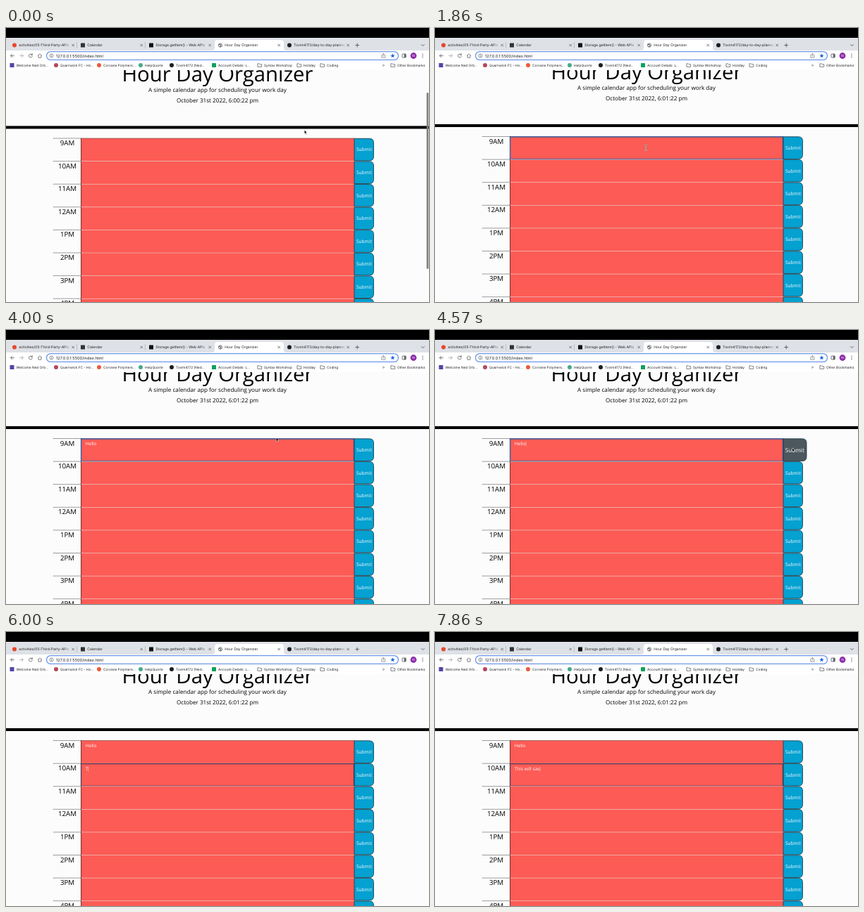
An HTML page that plays this animation: 600 px wide and 390 px high, repeating every 8000 ms.

```html
<!DOCTYPE html>
<html lang="en">
<head>
<meta charset="utf-8">
<title>Hour Day Organizer</title>
<style>
  html, body { margin: 0; width: 100%; height: 100%; overflow: hidden; background: #fcfcfc; }
  svg { display: block; text-rendering: geometricPrecision; }
  text { white-space: pre; }
  #page { font-family: "Open Sans", "Noto Sans", sans-serif; }
  #browser { font-family: Inter, Roboto, sans-serif; }
</style>
</head>
<body>
<svg width="600" height="390" viewBox="0 0 600 390">
  <defs>
    <linearGradient id="fade">
      <stop offset="0" stop-color="#dee1e6" stop-opacity="0"/>
      <stop offset="1" stop-color="#dee1e6"/>
    </linearGradient>
  </defs>
  <g id="page"></g>
  <g id="browser"></g>
  <g id="pointer"></g>
</svg>
<script>
const $ = id => document.getElementById(id);
const rect = (x, y, w, h, fill, more = '') =>
  `<rect x="${x}" y="${y}" width="${w}" height="${h}" fill="${fill}" ${more}/>`;
const circle = (x, y, r, fill, more = '') => `<circle cx="${x}" cy="${y}" r="${r}" fill="${fill}" ${more}/>`;
const path = (d, color, width = 0.8) =>
  `<path d="${d}" fill="none" stroke="${color}" stroke-width="${width}" stroke-linecap="round" stroke-linejoin="round"/>`;
const text = (x, y, size, str, fill = '#111', more = '') =>
  `<text x="${x}" y="${y}" font-size="${size}" fill="${fill}" ${more}>${str}</text>`;
const centred = (x, y, size, str, fill) => text(x, y, size, str, fill, 'text-anchor="middle"');
const icon = (x, y, color, round) => round ? circle(x, y, 3, color) : rect(x - 3, y - 3, 6, 6, color, 'rx="0.6"');

// ---- Browser frame ----
const GREY = '#5f6368';
const tabs = [
  [12, 'activities/05-Third-Party-APIs', '#e8472b', 1],
  [109, 'Calendar', '#333', 0],
  [206, 'Storage.getItem() - Web APIs', '#111', 0],
  [304, 'Hour Day Organizer', '', 0],
  [402, 'Tovim4172/day-to-day-planner', '#1b1f23', 1]
];
const bookmarks = [
  [8.5, 'Welcome Ned Orb...', '#5046a8', 0],
  [71, 'Quarnwick FC - Ho...', '#b5485a', 1],
  [132, 'Corvane Polymers...', '#ee5a3a', 1],
  [191, 'HelpQuorle', '#49a88a', 1],
  [235, 'Tovim4172 (Ned...', '#1b1f23', 1],
  [295, 'Account Details: L...', '#12a05c', 0],
  [360, 'Syntax Workshop'],
  [416, 'Holiday'],
  [449, 'Coding'],
  [549, 'Other Bookmarks']
];
const folder = (x, y) => path(`M${x - 2.7} ${y - 2.2}h2l.8 .9h2.6v3.6h-5.4z`, GREY);

function drawTab([x, title, color, round], i) {
  const active = i === 3;
  const glyph = active
    ? circle(x, 24.5, 2.6, 'none', `stroke="${GREY}" stroke-width="0.9"`) +
      path(`M${x - 2} 23.6h2l1 1.2-1.2 2`, GREY, 1.1)
    : icon(x, 24.5, color, round);
  return glyph +
    `<svg x="${x + 6}" y="18" width="73" height="13">${text(0.3, 8.4, 5.05, title, '#202124')}` +
    (active ? '' : rect(64, 0, 10, 13, 'url(#fade)')) + '</svg>' +
    path(`M${x + 81.8} 23.1l2.8 2.8m0 -2.8l-2.8 2.8`, '#45484c', 0.7) +
    (i < 2 ? path(`M${x + 88.5} 20.5v8`, '#9a9da2', 0.5) : '');
}

const star = Array.from({ length: 10 }, (_, i) => {
  const a = i * Math.PI / 5 - Math.PI / 2, r = i % 2 ? 1.5 : 3.4;
  return `${548.5 + r * Math.cos(a)},${39.6 + r * Math.sin(a)}`;
}).join(' ');

$('browser').innerHTML =
  rect(0, 0, 600, 14, '#000') + rect(0, 14, 600, 18, '#dee1e6') + rect(0, 32, 600, 28, '#fff') +
  `<path d="M292 32q4 0 4 -4v-7q0-4 4-4h90q4 0 4 4v7q0 4 4 4z" fill="#fff"/>` +
  tabs.map(drawTab).join('') +
  path('M495.8 24.5h4.8m-2.4 -2.4v4.8', '#45484c') +
  path('M589.3 23.5l2 2 2-2', '#45484c') +
  path('M11.5 39.5h-5m2.3 -2.3l-2.3 2.3 2.3 2.3', GREY) +
  path('M19.5 39.5h5m-2.3 -2.3l2.3 2.3-2.3 2.3', '#a5a8ac') +
  path('M37 38a2.5 2.5 0 1 0 .4 2.2M37.3 36.5v1.9h-1.9', GREY) +
  path('M45.2 39.4l2.8-2.6 2.8 2.6m-4.7 -.4v3.2h3.8v-3.2', GREY) +
  rect(57.5, 33.6, 499, 11.8, '#fff', 'rx="5.9" stroke="#6d98e8" stroke-width="1.3"') +
  circle(64.5, 39.5, 2.5, 'none', `stroke="${GREY}" stroke-width="0.7"`) + path('M64.5 39.3v1.3m0 -2.5v.1', GREY, 0.7) +
  text(71, 41.5, 5.7, '127.0.0.1:5500/index.html', '#202124') +
  path('M533.6 38.6h-.8v3.6h5v-3.6h-.8M535.3 40.3v-3.9m-1.3 1.2l1.3-1.3 1.3 1.3', GREY, 0.6) +
  `<polygon points="${star}" fill="#1a67e0"/>` +
  rect(562, 37, 5.2, 5, 'none', `rx="0.6" stroke="${GREY}" stroke-width="0.9"`) + rect(564.7, 37, 2.5, 5, GREY) +
  circle(578, 39.5, 4.4, '#8e2aab') + centred(578, 41.2, 4.6, 'N', '#fff') +
  [37.3, 39.5, 41.7].map(y => circle(591, y, 0.7, GREY)).join('') +
  bookmarks.map(([x, label, color, round]) =>
    (color ? icon(x, 53, color, round) : folder(x, 53)) + text(x + 6, 54.8, 4.8, label, '#202124')).join('') +
  centred(535.5, 54.8, 6, '»', GREY);

// ---- Page ----
const HOURS = ['9AM', '10AM', '11AM', '12AM', '1PM', '2PM', '3PM', '4PM'];
const PITCH = 32.6, LEFT = 106, RIGHT = 494, TOP = 154.5;
const STEP = 1000 / 7, STEPS = 56;
const CLICK_FIRST = 9, KEYS_FIRST = 18, CLICK_SUBMIT = 34, CLICK_SECOND = 39, KEYS_SECOND = 41;

// Pointer stops: step, x, y
const stops = [
  [0, 423.3, 145.3], [4, 423.3, 145.3], [9, 299, 170], [24, 299, 170], [28, 383.3, 153.3],
  [32, 507, 168], [35, 509, 168.7], [36, 509, 168.7], [39, 400, 203], [STEPS, 400, 203]
];
function pointerAt(n) {
  const i = stops.findIndex(s => s[0] > n);
  const [a, b] = [stops[i - 1], stops[i]];
  const u = (n - a[0]) / (b[0] - a[0]), e = u * u * (3 - 2 * u);
  return [a[1] + (b[1] - a[1]) * e, a[2] + (b[2] - a[2]) * e];
}

// One character per step; the second entry pauses for one step after "T" and after "wil".
function typed(n) {
  const first = 'Hello'.slice(0, Math.max(0, n - KEYS_FIRST + 1));
  const count = n < KEYS_SECOND ? 0 : n < 43 ? 1 : n < 51 ? Math.min(n, 49) - 41 : n - 42;
  return [first, 'This will sav'.slice(0, count)];
}

function caretOn(n, row) {
  const last = row ? Math.max(n >= KEYS_SECOND ? n : 0, CLICK_SECOND)
    : n < KEYS_FIRST ? CLICK_FIRST : Math.min(n, KEYS_FIRST + 4);
  return Math.floor((n - last) / 3.5) % 2 === 0;
}

function drawButton(y, hover, focus) {
  const w = hover ? 33 : 27.5, r = 6, h = PITCH - 1;
  const d = `M${RIGHT} ${y + 0.3}h${w - r}q${r} 0 ${r} ${r}v${h - 2 * r}q0 ${r} ${-r} ${r}h${r - w}z`;
  return (focus ? path(d, '#7d9cf0', 3) : '') +
    `<path d="${d}" fill="${hover ? '#4c585e' : '#04a1d1'}" stroke="#173441" stroke-width="0.8"/>` +
    centred(RIGHT + (hover ? 16.3 : 13.8), y + (hover ? 19 : 18.4), hover ? 8.13 : 6.6, 'Submit', '#fff');
}

function drawRow(i, y, entry, focus, caret) {
  const ring = focus
    ? rect(LEFT + 0.5, y + 0.5, RIGHT - LEFT - 1, PITCH - 1, 'none', `stroke="${i ? '#4a3a5c' : '#1d5fae'}" stroke-width="1.2"`)
    : '';
  return `<path d="M67 ${y}H${LEFT}" stroke="#222" stroke-width="0.7" stroke-dasharray="1.3 0.8"/>` +
    centred(87, y + 10, 9.75, HOURS[i], '#000') +
    rect(LEFT, y, RIGHT - LEFT, PITCH, '#fd5b55') +
    rect(LEFT, y - 0.3, RIGHT - LEFT, 0.7, i ? '#e9bdb9' : '#7a4a48') +
    rect(LEFT, y, 0.7, PITCH, '#3a2424') + ring +
    text(112.7, y + 9.8, 6.5, entry + (caret ? '<tspan dx="-1.2">|</tspan>' : ''), '#fff');
}

function drawPage(n, hover) {
  const shift = n ? 0 : 2.5;
  const focusRow = n >= CLICK_SECOND ? 1 : n >= CLICK_FIRST && n < CLICK_SUBMIT ? 0 : -1;
  const entries = typed(n);
  const submitFocus = n >= CLICK_SUBMIT && n < CLICK_SECOND;
  const rowY = i => TOP + i * PITCH;
  return rect(0, 60, 600, 330, '#fcfcfc') + `<g transform="translate(0 ${shift})">` +
    centred(300, 73.1, 29.27, 'Hour Day Organizer', '#000') +
    centred(300, 88.4, 8.13, 'A simple calendar app for scheduling your work day', '#000') +
    centred(300, 103, 8.13, `October 31st 2022, 6:0${n ? 1 : 0}:22 pm`, '#000') +
    rect(0, 136.9, 600, 4.1, '#000') +
    HOURS.map((_, i) => drawRow(i, rowY(i), entries[i] || '', i === focusRow, i === focusRow && caretOn(n, i))).join('') +
    HOURS.map((_, i) => drawButton(rowY(i), !i && hover, !i && submitFocus)).join('') + '</g>' +
    (n ? '' : rect(596.6, 92, 2.8, 251, '#7f7f7f', 'rx="1.4"'));
}

function drawPointer(n, x, y) {
  if (n >= KEYS_FIRST && n < 24 || n >= KEYS_SECOND) return '';
  if (x > LEFT && x < RIGHT && y > TOP) {
    const d = `M${x - 1.5} ${y - 3.6}q1.5 0 1.5 1.2v4.8q0 1.2 -1.5 1.2M${x + 1.5} ${y - 3.6}q-1.5 0 -1.5 1.2m0 4.8q0 1.2 1.5 1.2`;
    return path(d, '#f4dcd9', 1.5) + path(d, '#5a4442', 0.7);
  }
  return `<path d="M${x} ${y}v5.2l1.2-1.1 .9 2 .9-.4-.9-1.9h1.7z" fill="#000" stroke="#fff" stroke-width="0.45"/>`;
}

let shown = -1;
function tick() {
  const n = Math.floor((performance.now() % 8000 + 5) / STEP) % STEPS;
  if (n !== shown) {
    shown = n;
    const [x, y] = pointerAt(n);
    $('page').innerHTML = drawPage(n, x > RIGHT && y > TOP && y < TOP + PITCH);
    $('pointer').innerHTML = drawPointer(n, x, y);
  }
  requestAnimationFrame(tick);
}
tick();
</script>
</body>
</html>
```
